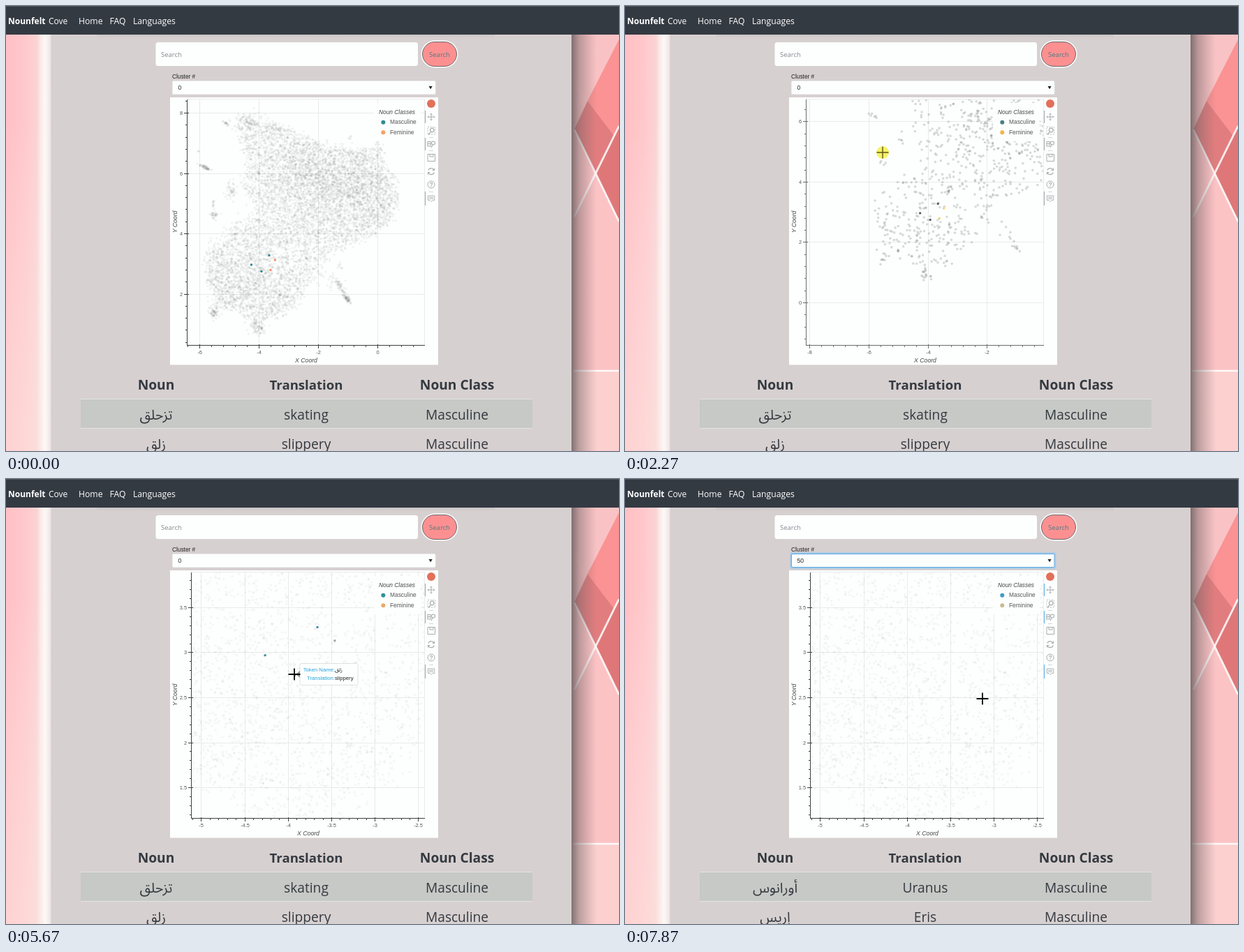
Write an HTML page with a canvas that moves like this. It is 878x638 px and loops after 8000 ms.

```html
<!DOCTYPE html>
<html lang="en">
<head>
<meta charset="utf-8">
<title>Noun cluster explorer</title>
<style>
html, body { margin: 0; width: 100%; height: 100%; overflow: hidden; background: #d7d0d0; }
svg, canvas { position: absolute; left: 0; top: 0; width: 878px; height: 638px; }
text { white-space: pre; }
.ui { font-family: "Open Sans", "Noto Sans", sans-serif; }
.ar { font-family: "Noto Sans Arabic", "DejaVu Sans", sans-serif; }
.plot { font-family: "Liberation Sans", Arial, sans-serif; }
.mid { text-anchor: middle; }
.end { text-anchor: end; }
.b { font-weight: 700; }
.i { font-style: italic; }
</style>
</head>
<body>
<svg id="back" viewBox="0 0 878 638">
  <defs>
    <linearGradient id="left">
      <stop offset="0" stop-color="#ffc0c4"/><stop offset=".45" stop-color="#ffc9cc"/>
      <stop offset=".68" stop-color="#fad3d4"/><stop offset=".76" stop-color="#fbe9e8"/>
      <stop offset=".86" stop-color="#fdf8f7"/><stop offset=".97" stop-color="#f0e8e7"/>
      <stop offset="1" stop-color="#dcd4d4"/>
    </linearGradient>
    <linearGradient id="pale" x2="0" y2="1">
      <stop offset=".2" stop-color="#fff" stop-opacity="0"/><stop offset="1" stop-color="#fbeee6" stop-opacity=".4"/>
    </linearGradient>
    <linearGradient id="shade">
      <stop offset="0" stop-color="#5d5557" stop-opacity=".78"/><stop offset=".3" stop-color="#6d6062" stop-opacity=".45"/>
      <stop offset="1" stop-color="#806a6c" stop-opacity="0"/>
    </linearGradient>
    <linearGradient id="under" x2="0" y2="1">
      <stop offset="0" stop-color="#b9bab8" stop-opacity=".5"/><stop offset="1" stop-color="#d7d0d0" stop-opacity="0"/>
    </linearGradient>
  </defs>
  <rect width="878" height="638" fill="#d7d0d0"/>
  <rect y="41" width="65" height="597" fill="url(#left)"/>
  <rect y="41" width="50" height="597" fill="url(#pale)"/>
  <rect x="810" y="41" width="68" height="597" fill="#fdc5c7"/>
  <path d="M810 41H878V48L833 136L810 92Z" fill="#f9c3c5"/>
  <path d="M878 48V172L871 186L833 136Z" fill="#fb9293"/>
  <path d="M833 136L871 186L844 240L814 177Z" fill="#e27d7f"/>
  <path d="M878 172V308L844 240Z" fill="#df7778"/>
  <path d="M844 240L878 308V522H814V300Z" fill="#fcc3c5"/>
  <path d="M810 524H878V638H810Z" fill="#fbd0cf"/>
  <g stroke="#fff" fill="none">
    <path d="M814 302L878 172" stroke-width="2.8" opacity=".85"/>
    <path d="M814 177L878 309" stroke-width="2.8" opacity=".85"/>
    <path d="M812 523H878" stroke-width="2.4" opacity=".9"/>
  </g>
  <rect x="810" y="41" width="36" height="597" fill="url(#shade)"/>
  <rect x="130" y="41" width="570" height="7" fill="url(#under)"/>
  <rect width="878" height="41" fill="#343a42"/>
  <rect width="878" height="1" fill="#50555b"/>
  <g class="ui" font-size="12.2" fill="#fff">
    <text x="3" y="25.5" class="b" font-size="12">Nounfelt</text><text x="61" y="25.5" font-size="12">Cove</text>
    <text x="104" y="25.5">Home</text><text x="148.5" y="25.5">FAQ</text><text x="182" y="25.5">Languages</text>
  </g>
  <rect x="214.500" y="52" width="375.500" height="34" rx="3.500" fill="#fdfffe"/>
  <text class="ui" x="222" y="72.500" font-size="9.500" fill="#83898e">Search</text>
  <rect x="594.500" y="49.500" width="53" height="39" rx="19.500" fill="#fdfffe"/>
  <rect x="596.500" y="51.500" width="49" height="35" rx="17.500" fill="#fc9091" stroke="#5a5c60" stroke-width=".9"/>
  <text class="ui mid" x="621" y="72.500" font-size="9.500" fill="#4d7c84">Search</text>
  <text class="plot" x="238" y="104" font-size="8.300" fill="#222">Cluster #</text>
  <rect x="235" y="131" width="384" height="383.500" fill="#fdfffe"/>
  <rect x="107" y="564" width="647" height="41" fill="#c7c9c6"/>
  <path d="M107 563.500H754M107 605.500H754" stroke="#e3e4e2"/>
  <g class="ui mid b" font-size="19.200" fill="#343a40">
    <text x="215" y="550">Noun</text><text x="430" y="550" font-size="18.600">Translation</text><text x="646" y="550">Noun Class</text>
  </g>
</svg>
<canvas id="dots" width="878" height="638"></canvas>
<svg id="front" viewBox="0 0 878 638"></svg>
<script>
const LOOP = 8000, TOP = 134, BOTTOM = 487, RIGHT = 600;
const PAN_START = 1560, PAN_END = 2480, DETAIL = 3850, PICK = 7060;
const ZOOMS = [3040, 3140, 3185, 3230, 3280, 3330];
const front = document.getElementById('front');
const ctx = document.getElementById('dots').getContext('2d');

// pointer: time, x, y
const PATH = [
  [100, 850, 655], [930, 394, 257], [1480, 308, 287], [PAN_START, 297.7, 284],
  [2270, 369, 210], [PAN_END, 381.3, 175.2], [2600, 381.3, 175.2], [2950, 468, 267],
  [3450, 468, 267], [3950, 456, 276], [4140, 453, 275], [4800, 453, 275],
  [5140, 413, 280], [5880, 413, 280], [6180, 425, 117], [6290, 425, 117],
  [6540, 421, 241], [6690, 440, 300], [PICK, 440, 300], [7800, 512, 315]
];

// colours per phase
const LEGEND = [['#2f8a94', '#f5a066'], ['#4a7d88', '#f3b44c'], ['#2f8f98', '#e9ab68'], ['#3d9bc6', '#cbb990']];
const MARKS = [['#2f8a94', '#f5906a'], ['#555e66', '#f4d070'], ['#3f87a8', '#a5a59f']];
const AXIS = ['#3c3f42', '#6a6d6f', '#3c3f42', '#3c3f42'];
const NOUNS = [
  [-3.665, 3.283, 0], [-4.267, 2.971, 0], [-3.925, 2.751, 0], [-3.465, 3.133, 1], [-3.618, 2.798, 1]
];

const between = (t, a, b) => t >= a && t < b;

function pointerAt(t) {
  const n = PATH.findIndex(p => p[0] > t);
  if (n === 0) return [PATH[0][1], PATH[0][2]];
  if (n < 0) return PATH[PATH.length - 1].slice(1);
  const [t0, x0, y0] = PATH[n - 1], [t1, x1, y1] = PATH[n];
  let u = (t - t0) / (t1 - t0);
  u *= u * (3 - 2 * u);
  return [x0 + (x1 - x0) * u, y0 + (y1 - y0) * u];
}

// seeded random cloud of words
let seed = 77;
function rnd() {
  seed = (seed + 0x6D2B79F5) | 0;
  let r = Math.imul(seed ^ (seed >>> 15), 1 | seed);
  r = (r + Math.imul(r ^ (r >>> 7), 61 | r)) ^ r;
  return ((r ^ (r >>> 14)) >>> 0) / 4294967296;
}
const gauss = () => Math.sqrt(-2 * Math.log(1 - rnd())) * Math.cos(2 * Math.PI * rnd());
const bump = (x, y, cx, cy, w, h) => Math.exp(-(((x - cx) / w) ** 2) - ((y - cy) / h) ** 2);

function makeCloud() {
  const shape = new Path2D('M331 168L346 160L378 172L402 176L432 190L458 200L490 206L530 206L545 232L560 262L563 287' +
    'L545 314L512 338L480 347L455 368L440 388L426 412L410 434L390 445L370 456L360 464L350 450L330 434L308 436L296 440' +
    'L302 418L289 398L286 365L293 347L312 325L332 312L350 300L358 286L348 268L338 250L350 238L342 215L334 200Z');
  // x, y, length spread, width spread, angle, count
  const clumps = [
    [285, 231, 5, 1.2, .45, 60], [315, 168, 3, 1, .6, 20], [323, 266, 4, 7, 0, 50],
    [298, 300, 3, 3, 0, 35], [297, 284, 1, 4, 0, 12], [479, 402, 11, 2, 1, 50],
    [488, 419, 5, 1.6, .9, 65], [480, 373, 2, 3, 0, 8], [492, 188, 1.5, 1.5, 0, 6],
    [346, 163, 9, 6, 0, 80], [385, 175, 8, 4, .4, 55], [297, 439, 3, 4, 0, 55],
    [361, 463, 5, 4, 0, 55], [534, 200, 4, 9, 0, 35], [276, 208, .5, .5, 0, 3], [470, 395, 9, 9, 0, 30]
  ];
  const list = [];
  const add = (x, y) => list.push([-6 + (x - 278) / 42.4, 2 + (413 - y) / 43.25]);
  while (list.length < 7800) {
    const x = 282 + rnd() * 286, y = 150 + rnd() * 322;
    const d = .44 + .4 * bump(x, y, 495, 262, 72, 48) + .25 * bump(x, y, 430, 225, 50, 50) +
      .35 * bump(x, y, 330, 402, 42, 38);
    if (ctx.isPointInPath(shape, x, y) && rnd() < d) add(x + gauss() * 4.5, y + gauss() * 4.5);
  }
  for (const [x, y, l, w, a, n] of clumps) {
    for (let k = 0; k < n; k++) {
      const u = gauss() * l, v = gauss() * w;
      add(x + u * Math.cos(a) - v * Math.sin(a), y + u * Math.sin(a) + v * Math.cos(a));
    }
  }
  return list;
}
const cloud = makeCloud();

function viewAt(t) {
  const [px, py] = pointerAt(Math.min(Math.max(t, PAN_START), PAN_END));
  const zoom = 1.2 ** ZOOMS.filter(z => t >= z).length;
  const step = zoom < 1.1 ? 2 : zoom < 1.9 ? 1 : .5;
  const left = step === 2 ? 260 : step === 1 ? 262 : 266;
  const kx = zoom * (RIGHT - left) / 340;
  const ox = 362.7 + px - 297.7, oy = 413 + py - 284;
  return {
    step, left, zoom, sx: 42.4 * kx, sy: 43.25 * zoom,
    ox: zoom > 1 ? 468 + (ox - 468) * kx : ox,
    oy: zoom > 1 ? 267 + (oy - 267) * zoom : oy
  };
}
const toX = (v, x) => v.ox + (x + 4) * v.sx;
const toY = (v, y) => v.oy - (y - 2) * v.sy;

function ticks(lo, hi, step) {
  const out = [], minor = step / 5;
  for (let i = Math.ceil(lo / minor); i * minor <= hi; i++) {
    out.push({ val: i * minor, major: i % 5 === 0, label: `${+(i * minor).toFixed(1)}` });
  }
  return out;
}
function axesOf(v) {
  return {
    xs: ticks((v.left - v.ox) / v.sx - 4, (RIGHT - v.ox) / v.sx - 4, v.step),
    ys: ticks(2 - (BOTTOM - v.oy) / v.sy, 2 - (TOP - v.oy) / v.sy, v.step)
  };
}

function dot(x, y, r, fill) {
  ctx.fillStyle = fill;
  ctx.beginPath();
  ctx.arc(x, y, r, 0, 7);
  ctx.fill();
}

function drawDots(v, axes, coarse, phase) {
  ctx.clearRect(0, 0, 878, 638);
  ctx.save();
  ctx.beginPath();
  ctx.rect(v.left, TOP, RIGHT - v.left, BOTTOM - TOP);
  ctx.clip();
  ctx.fillStyle = '#e9ebea';
  for (const k of axes.xs) if (k.major) ctx.fillRect(Math.floor(toX(v, k.val)), TOP, 1, BOTTOM - TOP);
  for (const k of axes.ys) if (k.major) ctx.fillRect(v.left, Math.floor(toY(v, k.val)), RIGHT - v.left, 1);
  const fill = coarse ? 'rgba(85,85,85,.22)' : v.zoom > 1 ? 'rgba(80,80,80,.045)' : 'rgba(80,80,80,.065)';
  const r = coarse ? 1.8 : v.zoom > 1 ? 1.8 : 1.6;
  for (let n = 0; n < cloud.length; n += coarse ? 10 : 1) {
    const x = toX(v, cloud[n][0]), y = toY(v, cloud[n][1]);
    if (x > v.left - 3 && x < RIGHT + 3 && y > TOP - 3 && y < BOTTOM + 3) dot(x, y, r, fill);
  }
  if (phase < 3) for (const [x, y, kind] of NOUNS) dot(toX(v, x), toY(v, y), 1.7, MARKS[phase][kind]);
  ctx.restore();
}

const text = (x, y, s, size, fill, cls = 'plot', more = '') =>
  `<text x="${x}" y="${y}" font-size="${size}" fill="${fill}" class="${cls}" ${more}>${s}</text>`;
const rect = (x, y, w, h, fill, more = '') =>
  `<rect x="${x}" y="${y}" width="${w}" height="${h}" fill="${fill}" ${more}/>`;
const line = (d, stroke, w = 1, more = '') =>
  `<path d="${d}" fill="none" stroke="${stroke}" stroke-width="${w}" ${more}/>`;

function axisMarkup(v, axes, color) {
  let d = `M${v.left - .5} ${TOP}V${BOTTOM}M${v.left} ${BOTTOM - .5}H${RIGHT}`, s = '';
  for (const k of axes.xs) {
    const x = Math.floor(toX(v, k.val)) + .5;
    d += `M${x} ${k.major ? BOTTOM - 2 : BOTTOM}V${BOTTOM + (k.major ? 4 : 2)}`;
    if (k.major) s += text(x, 498.5, k.label, 7.4, '#555', 'plot mid');
  }
  for (const k of axes.ys) {
    const y = Math.floor(toY(v, k.val)) + .5;
    d += `M${v.left - (k.major ? 5 : 3)} ${y}H${v.left + (k.major ? 2 : 0)}`;
    if (k.major) s += text(v.left - 7, y + 2.6, k.label, 7.4, '#555', 'plot end');
  }
  return line(`M${v.left} ${TOP - .5}H${RIGHT}M${RIGHT - .5} ${TOP}V${BOTTOM}`, '#e9ebea') +
    line(d, color, 1, 'shape-rendering="crispEdges"') + s +
    text((v.left + RIGHT) / 2, 511, 'X Coord', 8.7, '#444', 'plot mid i') +
    text(0, 0, 'Y Coord', 8.7, '#444', 'plot mid i', 'transform="translate(244.5 309.5) rotate(-90)"');
}

function legendMarkup([m, f]) {
  return rect(527, 139, 67, 55, '#fdfffe', 'opacity=".95"') +
    text(534, 155, 'Noun Classes', 8.35, '#444', 'plot i') +
    `<circle cx="540.3" cy="166.700" r="3" fill="${m}"/><circle cx="540.3" cy="181.300" r="3" fill="${f}"/>` +
    text(550, 169.3, 'Masculine', 8.4, '#555') + text(550, 183.6, 'Feminine', 8.4, '#555');
}

function toolMarkup(active) {
  const g = '#a9acad';
  return '<circle cx="609" cy="140" r="6" fill="#e2705a"/>' +
    line('M600.500 150V168M600.500 189V207M600.500 266V286', active) +
    line('M606 188.500H612M606 207.500H612M606 266.500H612', '#d5d7d6') +
    line('M604 159H614M609 154V164M605.500 157.500L604 159L605.500 160.500M612.500 157.500L614 159L612.500 160.500' +
      'M607.500 155.500L609 154L610.500 155.500M607.500 162.500L609 164L610.500 162.500', g) +
    line('M604 173.500H614.500V184H604Z', g, .8, 'stroke-dasharray="2 1.500"') +
    line('M608 181L605 184.500M613 178A2.800 2.800 0 1 1 607.400 178A2.800 2.800 0 1 1 613 178', g, 1.2) +
    line('M604 194.500H608V201H604ZM604 197.500H608M614.500 196.500A2.500 2.500 0 1 1 609.500 196.500' +
      'A2.500 2.500 0 1 1 614.500 196.500M611 199L609 203', g, 1.1) +
    line('M604 212.500H614.500V222.500H604ZM607 212.500V216H612V212.500', g) +
    line('M604.800 235.500A4.500 4.500 0 0 1 613 235M613.400 238.500A4.500 4.500 0 0 1 605 239' +
      'M613.500 232.500V235.500H610.500M604.500 241.500V238.500H607.500', g, 1.1) +
    `<circle cx="609" cy="256" r="5" fill="none" stroke="${g}"/>` + text(609, 259, '?', 8.5, g, 'plot mid b') +
    line('M604.500 272H613.700V278.500H611L609 280.500L607 278.500H604.500ZM606 274.300H612M606 276.300H612', g, .9);
}

// rows: pairs of word and translation; the box opens left or right of the tip
function tipMarkup(tipX, y, w, right, rows) {
  const x = right ? tipX + 6 : tipX - 6 - w, h = 7 + rows.length * 24, top = y - h / 2, c = x + 50;
  const edge = right ? x : x + w;
  let s = rect(x, top, w, h, '#fdfffe', 'rx="2" stroke="#dfe2e1" opacity=".96"') +
    `<path d="M${tipX} ${y}L${edge} ${y - 5}V${y + 5}Z" fill="#909394"/>`;
  rows.forEach(([word, english], n) => {
    const b = top + 11.5 + n * 24;
    s += text(c, b, 'Token Name:', 7.7, '#26a3dc', 'plot end') + text(c, b, word, 7.7, '#222', 'ar') +
      text(c, b + 12, 'Translation:', 7.7, '#26a3dc', 'plot end') + text(c, b + 12, english, 7.7, '#222');
  });
  return s;
}

function selectMarkup(value, focus) {
  const glow = focus ? rect(237, 106, 379.5, 22, 'none', 'rx="3" stroke="#8cc6f2" stroke-width="2" opacity=".6"') : '';
  return glow + rect(238.5, 107.5, 376.5, 19, '#fdfffe', `rx="1.500" stroke="${focus ? '#5aa9e6' : '#eceeed'}"`) +
    text(246.5, 120, value, 8.6, '#222') + '<path d="M605.500 115H610.700L608.100 119.300Z" fill="#222"/>';
}

function menuMarkup(first, py) {
  const rowH = 10.95, y0 = 128.5, hot = py > y0 ? Math.floor((py - y0) / rowH) : 0;
  let s = rect(236.5, 128, 381, 223, '#000', 'opacity=".12" rx="2"') +
    rect(238.5, 128.5, 377, 219.5, '#fdfffe', 'stroke="#5c6064"') +
    rect(604, 129, 11, 218.5, '#f1f2f1') +
    rect(605, 141 + first / 280 * 198, 9, 14, '#c1c2c1') +
    '<path d="M607 136.500H612L609.500 133.500Z" fill="#9a9c9b"/><path d="M607 340.500H612L609.500 343.500Z" fill="#50565a"/>';
  for (let n = 0; n < 20; n++) {
    const y = y0 + n * rowH;
    if (n === hot) s += rect(239, y, 364.5, rowH, '#1e90ff');
    s += text(247, y + 8.2, first + n, 8.3, n === hot ? '#fff' : '#16304a');
  }
  return s;
}

function tableMarkup(rows) {
  return rows.map(([word, english], n) => {
    const y = 592.5 + n * 42;
    return text(215, y, word, 20, '#343a40', 'ar mid') + text(430, y, english, 19.2, '#343a40', 'ui mid') +
      text(646, y, 'Masculine', 19.1, '#343a40', 'ui mid');
  }).join('');
}

function pointerMarkup(t, x, y, cross) {
  const down = between(t, PAN_START, PAN_END) || between(t, 6200, 6270) || between(t, 7000, PICK);
  const halo = down ? `<circle cx="${x}" cy="${y}" r="9" fill="#f5f04e" opacity=".85"/>` : '';
  if (cross) {
    const d = `M${x - 8.5} ${y}H${x + 8.5}M${x} ${y - 8.5}V${y + 8.5}`;
    return halo + line(d, down ? '#5c5716' : '#0a0a0c', down ? 1.4 : 1.8);
  }
  return halo + `<path transform="translate(${x} ${y})" d="M0 0V11L2.600 8.700L4.500 12.700L6.300 11.900L4.500 8H8Z" ` +
    'fill="#fff" stroke="#2a2d30" stroke-width=".9"/>';
}

let lastDots = '', lastFront = '';
function draw(t) {
  const v = viewAt(t), axes = axesOf(v), [px, py] = pointerAt(t);
  const coarse = between(t, PAN_START, DETAIL), picked = t >= PICK;
  const phase = picked ? 3 : t < PAN_START ? 0 : t < 2600 ? 1 : 2;
  const open = between(t, 6270, PICK);
  const key = [v.ox, v.oy, v.zoom, coarse, phase].join();
  if (key !== lastDots) drawDots(v, axes, coarse, phase);
  lastDots = key;

  let s = axisMarkup(v, axes, AXIS[phase]) + legendMarkup(LEGEND[phase]) + toolMarkup(picked ? '#5aaee6' : '#a3a7ab');
  if (between(t, 2960, 3140)) s += tipMarkup(467, 265.7, 88.5, false, [['خرسانة', 'concrete'], ['فكة', 'humorous']]);
  if (between(t, 4410, 4810)) s += tipMarkup(453, 273, 78, false, [['تزحلق', 'skating']]);
  if (between(t, 5670, 5940)) s += tipMarkup(415, 280, 83, true, [['زلق', 'slippery']]);
  s += selectMarkup(picked ? 50 : 0, t >= 6200);
  if (open) s += menuMarkup(t < 6750 ? 0 : t < 6840 ? 12 : t < 6930 ? 24 : 35, py);
  s += tableMarkup(t < PICK + 60
    ? [['تزحلق', 'skating'], ['زلق', 'slippery']]
    : [['أورانوس', 'Uranus'], ['إريس', 'Eris']]);
  const inPlot = px > v.left && px < RIGHT && py > TOP && py < BOTTOM;
  s += pointerMarkup(t, px, py, inPlot && !open);
  if (s !== lastFront) front.innerHTML = s;
  lastFront = s;
}

function tick() {
  draw(performance.now() % LOOP);
  requestAnimationFrame(tick);
}
tick();
</script>
</body>
</html>
```
